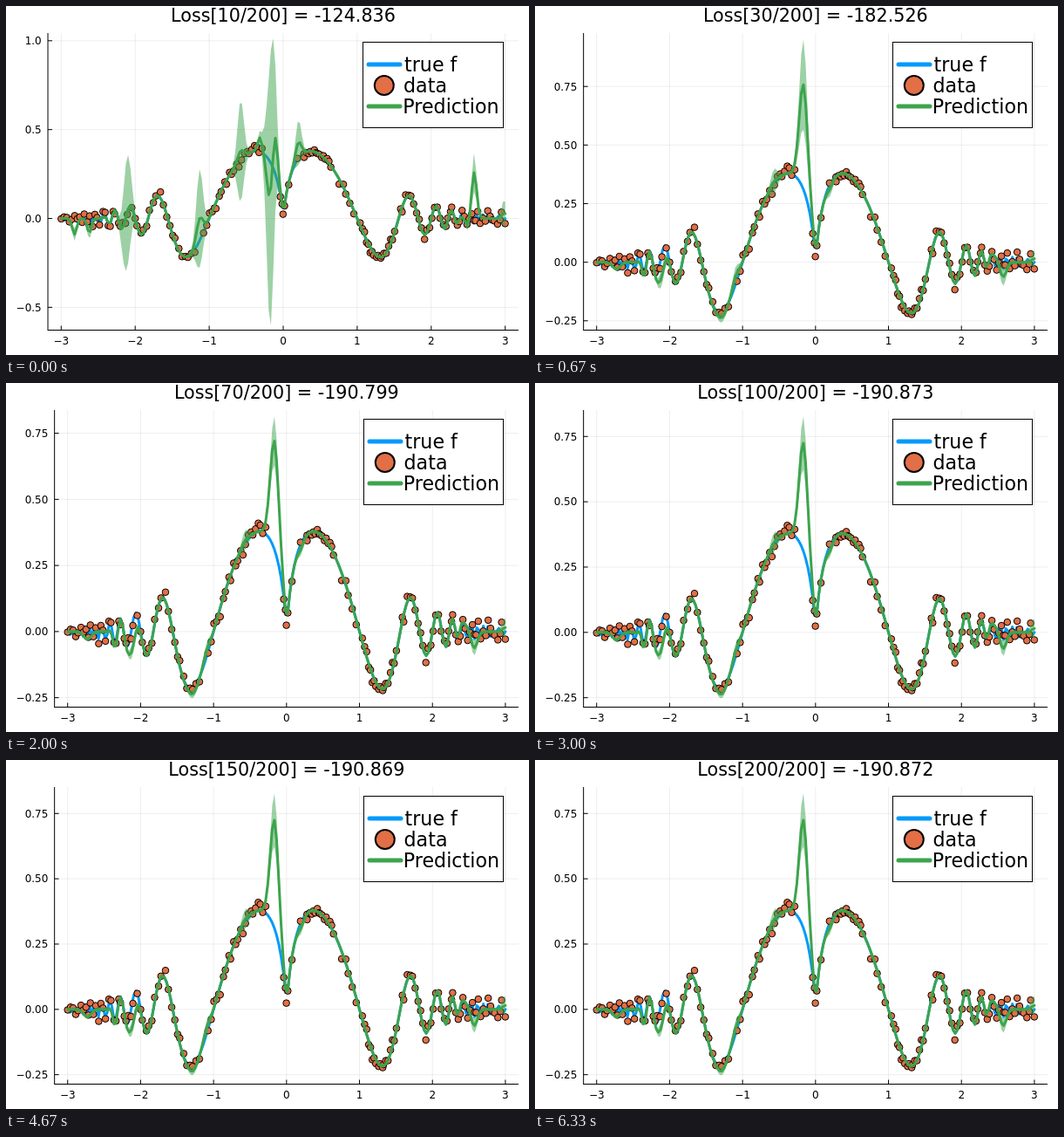
Write an HTML page that moves like this. It is 600x400 px and loops after 6.66 s.

```html
<!DOCTYPE html>
<html lang="en">
<head>
<meta charset="utf-8">
<title>Regression training</title>
<style>
  html, body { margin: 0; width: 100%; height: 100%; overflow: hidden; background: #fff; }
  svg { display: block; }
  text { font-family: "DejaVu Sans", sans-serif; fill: #000; }
  .tick { font-size: 12px; }
  .title { font-size: 20.7px; }
  .legend { font-size: 22.2px; }
  .curve { fill: none; stroke-width: 3; stroke-linejoin: round; stroke-linecap: round; }
</style>
</head>
<body>
<svg id="stage" width="600" height="400" viewBox="0 0 600 400"></svg>
<script>
const BLUE = '#009afa', ORANGE = '#e26f46', GREEN = '#3da44d';
const LOOP = 6660, STEPS = 20, TOP = 31, BOTTOM = 371.5, RIGHT = 588;
const stage = document.getElementById('stage');

const mix = (a, b, k) => a + (b - a) * k;
const trueF = x => {
  const t = Math.PI * Math.abs(x) ** Math.abs(x);
  return Math.sin(t) / t;
};
const grid = Array.from({ length: 200 }, (_, i) => -3 + 6 * i / 199);

let seed = 7;
const random = () => (seed = seed * 16807 % 2147483647) / 2147483647;

// Noisy samples in runs of [from, to, count]; the gap left of zero stays empty.
const runs = [[-3, -2.2, 24], [-2.18, -1.2, 24], [-1.07, -.29, 24], [-.036, .014, 4],
  [.08, .26, 3], [.29, .64, 15], [.74, .97, 5], [1.04, 1.5, 18], [1.58, 2.2, 18], [2.22, 2.99, 25]];
const samples = runs.flatMap(([from, to, count]) => Array.from({ length: count }, (_, i) => {
  const gap = (to - from) / (count - 1);
  const x = Math.max(-3, Math.min(3, from + gap * (i + (random() - .5) * .6)));
  const noise = (random() + random() + random() - 1.5) * .026;
  return [x, trueF(x) + noise];
}));

// Each bump is [centre, spread, shift of the mean, extra half-width of the ribbon].
const rough = {
  low: -.581, high: .996, loss: 124.836,
  bumps: [[-2.82, .03, -.09, .03], [-2.62, .03, -.08, .03], [-2.11, .05, 0, .31],
    [-1.13, .045, .125, .27], [-.575, .042, .05, .28], [-.315, .03, .08, .02],
    [-.187, .036, -.21, 0], [-.165, .052, 0, .77], [-.105, .033, .22, 0],
    [.205, .04, .09, .12], [2.5, .03, -.05, .02], [2.58, .035, .26, .1], [2.985, .03, .03, .07]]
};
const calm = (loss, peak, width, side) => ({
  low: -.254, high: peak + width, loss,
  bumps: [[-2.73, .05, -.03, 0], [-2.36, .03, -.035, 0], [-2.1, .045, -.1, side * .7],
    [-1.28, .06, -.022, side * .3], [-1.1, .045, side * .8, side * .7], [-.57, .045, .012, side],
    [-.165, .058, peak - .31, width], [.2, .04, -.022, side * .5],
    [2.44, .06, .03, 0], [2.57, .045, -.065, side * .7], [3, .04, .015, .03]]
});
const states = [
  rough,
  calm(182.526, .757, .185, .045),
  calm(189.654, .69, .075, .028),
  calm(190.799, .72, .086, .03),
  calm(190.871, .724, .095, .03)
];

const sum = (bumps, x, col) =>
  bumps.reduce((total, b) => total + b[col] * Math.exp(-((x - b[0]) ** 2) / (2 * b[1] * b[1])), 0);

// The fit follows the curve until its ripples get too fast.
const fade = x => 1 / (1 + Math.exp((Math.abs(x) - 2.38) / .03));
const mean = (s, x) => trueF(x) * fade(x) + sum(s.bumps, x, 2);
const spread = (s, x) => .007 + sum(s.bumps, x, 3);

const num = (v, digits) => (v < 0 ? '\u2212' : '') + Math.abs(v).toFixed(digits);
const line = (x1, y1, x2, y2, color = '#000', width = 1, extra = '') =>
  `<line x1="${x1}" y1="${y1}" x2="${x2}" y2="${y2}" stroke="${color}" stroke-width="${width}" ${extra}/>`;
const text = (x, y, str, cls, anchor = 'start') =>
  `<text x="${x}" y="${y}" class="${cls}" text-anchor="${anchor}">${str}</text>`;
const dot = (x, y, r, width) =>
  `<circle cx="${x.toFixed(2)}" cy="${y.toFixed(2)}" r="${r}" fill="${ORANGE}" stroke="#000" stroke-width="${width}"/>`;

// Fit limits, tick gap and left margin to the data range.
function layout(low, high) {
  const range = high - low, scale = (BOTTOM - TOP) / (1.06 * range);
  const zero = BOTTOM + (low - .03 * range) * scale;
  const gap = range > 1.25 ? .5 : range > 1.03 ? .25 : .2;
  const digits = gap === .25 ? 2 : 1;
  const minus = zero + gap * scale < BOTTOM ? .838 : 0;
  const left = 18.9 + 12 * (.318 + .636 * (digits + 1) + minus);
  return {
    gap, digits, left,
    X: v => left + (v + 3.18) * (RIGHT - left) / 6.36,
    Y: v => zero - v * scale
  };
}

function axes({ left, X, Y, gap, digits }) {
  const faint = 'stroke-opacity=".07"';
  let out = '';
  for (let v = -3; v <= 3; v++) {
    const x = X(v);
    out += line(x, TOP, x, BOTTOM, '#000', 1, faint) + line(x, BOTTOM, x, BOTTOM - 5)
      + text(x, 387.5, num(v, 0), 'tick', 'middle');
  }
  for (let i = -2; i <= 5; i++) {
    const v = i * gap, y = Y(v);
    if (y < TOP || y > BOTTOM) continue;
    out += line(left, y, RIGHT, y, '#000', 1, faint) + line(left, y, left + 5, y)
      + text(left - 7.3, y + 4.3, num(v, digits), 'tick', 'end');
  }
  return out + line(left, TOP, left, BOTTOM + .5) + line(left, BOTTOM, RIGHT, BOTTOM);
}

function legend(left) {
  const d = Math.round((left - 48) / 8), x0 = 409.5 + d;
  const sample = (y, color) => line(416 + d, y, 452 + d, y, color, 5, 'stroke-linecap="round"');
  return `<rect x="${x0}" y="41.5" width="${570.5 - x0}" height="98" fill="#fff" stroke="#000"/>`
    + sample(67, BLUE) + dot(433.8 + d, 91, 11, 2) + sample(115, GREEN)
    + text(457 + d / 2, 75, 'true f', 'legend') + text(456 + d / 2, 99, 'data', 'legend')
    + text(455.3 + d / 2, 123, 'Prediction', 'legend');
}

function picture(step) {
  const level = Math.min(4, step / 2), k = level % 1;
  const a = states[Math.floor(level)], b = states[Math.ceil(level)];
  const blend = key => mix(a[key], b[key], k);
  const view = layout(blend('low'), blend('high')), { X, Y, left } = view;
  const wobble = level === 4 ? .006 * Math.cos((step - 11) * .61) : 0;
  const loss = (blend('loss') + wobble).toFixed(3);

  const m = grid.map(x => mix(mean(a, x), mean(b, x), k));
  const w = grid.map(x => mix(spread(a, x), spread(b, x), k));
  const path = ys => ys.map((y, i) => X(grid[i]).toFixed(2) + ',' + Y(y).toFixed(2));
  const curve = (ys, color) =>
    `<polyline class="curve" stroke="${color}" points="${path(ys).join(' ')}"/>`;
  const upper = path(m.map((y, i) => y + w[i])), lower = path(m.map((y, i) => y - w[i]));
  return axes(view)
    + curve(grid.map(trueF), BLUE)
    + samples.map(([x, y]) => dot(X(x), Y(y), 3.8, 1)).join('')
    + `<polygon fill="${GREEN}" fill-opacity=".5" points="${upper.concat(lower.reverse()).join(' ')}"/>`
    + curve(m, GREEN)
    + legend(left)
    + text((left + RIGHT) / 2, 18.4, `Loss[${(step + 1) * 10}/200] = -${loss}`, 'title', 'middle');
}

const pictures = Array.from({ length: STEPS }, (_, i) => picture(i));
const starts = pictures.map((_, i) => Math.round(i * 100 / 3) * 10);
const began = performance.now();
let shown = -1;

function draw() {
  const t = (performance.now() - began) % LOOP;
  const now = starts.filter(s => s <= t).length - 1;
  if (now !== shown) stage.innerHTML = pictures[shown = now];
  requestAnimationFrame(draw);
}
draw();
</script>
</body>
</html>
```
